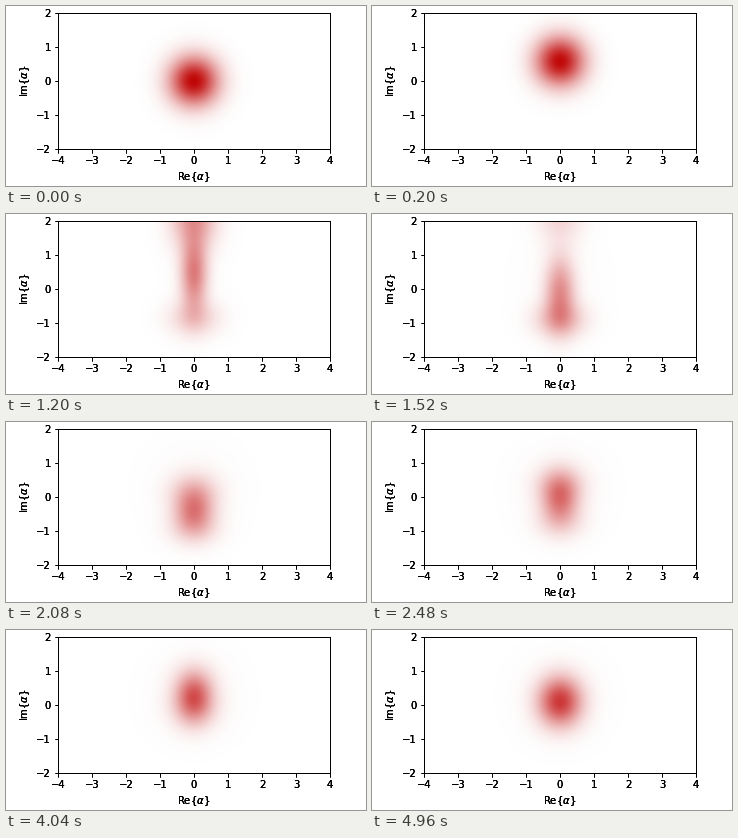
A matplotlib script for the animation above (5000 ms loop, 360 px wide and 180 px high).

```python
import numpy as np
import matplotlib.pyplot as plt
from matplotlib.animation import FuncAnimation
from matplotlib.colors import LinearSegmentedColormap

plt.rcParams.update({"font.family": "DejaVu Sans", "font.size": 10})

W, H, DPI = 360, 180, 72
FRAMES, STEP = 125, 40
BOX = [52 / W, 37 / H, 272 / W, 136 / H]
EXTENT = (-4, 4, -2, 2)

# Rows: time (s), height, centre on Im; the core also has its two widths
BLOB = np.array([(0, 1, 0), (.2, .99, .58), (.52, .97, 1.26),
                 (.85, .62, 1.78), (1.2, .42, 2.15), (1.75, 0, 2.35)])
CORE = np.array([(.52, 0, 1.1, .4, .5), (.85, .28, .95, .32, .6),
                 (1.2, .52, .45, .27, .75), (1.6, .42, -.2, .31, .68),
                 (2.08, .43, -.4, .38, .45), (2.6, .46, .02, .35, .52),
                 (3.12, .51, .2, .33, .5), (5, .58, .1, .42, .48)])
LOW = np.array([(.75, 0, -.4), (1.2, .2, -.85), (1.6, .28, -.9),
                (2.08, .15, -.9), (3.12, .14, -.3), (5, .12, -.1)])
HIGH = np.array([(1.5, 0, .2), (2.08, .2, .15), (3.12, .11, .75), (5, .1, .3)])

x = -4 + (np.arange(272) + .5) / 34
y = -2 + (np.arange(136) + .5) / 34


def hermite(rows, t):
    """Smooth curve through the key rows, held at both ends."""
    times, vals = rows[:, 0], rows[:, 1:]
    t = np.clip(t, times[0], times[-1])
    i = min(np.searchsorted(times, t, side="right") - 1, len(times) - 2)
    slope = np.gradient(vals, times, axis=0)
    h = times[i + 1] - times[i]
    u = (t - times[i]) / h
    return ((1 + 2 * u) * (1 - u) ** 2 * vals[i]
            + u * (1 - u) ** 2 * h * slope[i]
            + u * u * (3 - 2 * u) * vals[i + 1]
            + u * u * (u - 1) * h * slope[i + 1])


def ramp(t, start, end):
    u = np.clip((t - start) / (end - start), 0, 1)
    return u * u * (3 - 2 * u)


def gauss(amp, mid, sx, sy):
    return max(amp, 0) * np.outer(np.exp(-((y - mid) / sy) ** 2 / 2),
                                  np.exp(-(x / sx) ** 2 / 2))


def density(t):
    rise, settle = ramp(t, .52, 1.2), ramp(t, 3, 5)
    return (gauss(*hermite(BLOB, t), .5 - .04 * rise, .5 + .15 * rise)
            + gauss(*hermite(CORE, t))
            + gauss(*hermite(LOW, t), .52, .37 + .13 * settle)
            + gauss(*hermite(HIGH, t), .5, .4 + .1 * settle)
            + gauss(.02 * ramp(t, 1, 2), .3, .9, .9))


def add_frame(fig, label):
    ax = fig.add_axes(BOX, label=label)
    ax.patch.set_visible(False)
    ax.set(xlim=EXTENT[:2], ylim=EXTENT[2:],
           xticks=range(-4, 5), yticks=range(-2, 3))
    ax.set_xlabel(r"$\mathrm{Re}\{\alpha\}$")
    ax.set_ylabel(r"$\mathrm{Im}\{\alpha\}$")
    return ax


fig = plt.figure(figsize=(W / DPI, H / DPI), dpi=DPI, facecolor="white")
# Stacked copies give the heavy lettering
axes = [add_frame(fig, f"layer {k}") for k in range(3)]
reds = LinearSegmentedColormap.from_list("reds", ["white", "#c00606"], N=512)
image = axes[0].imshow(density(0), extent=EXTENT, origin="lower", cmap=reds,
                       vmin=0, vmax=1, aspect="auto", interpolation="nearest")


def update(n):
    image.set_data(density(n * STEP / 1000))
    return [image]


anim = FuncAnimation(fig, update, frames=FRAMES, interval=STEP,
                     repeat=True, repeat_delay=0)
plt.show()
```
